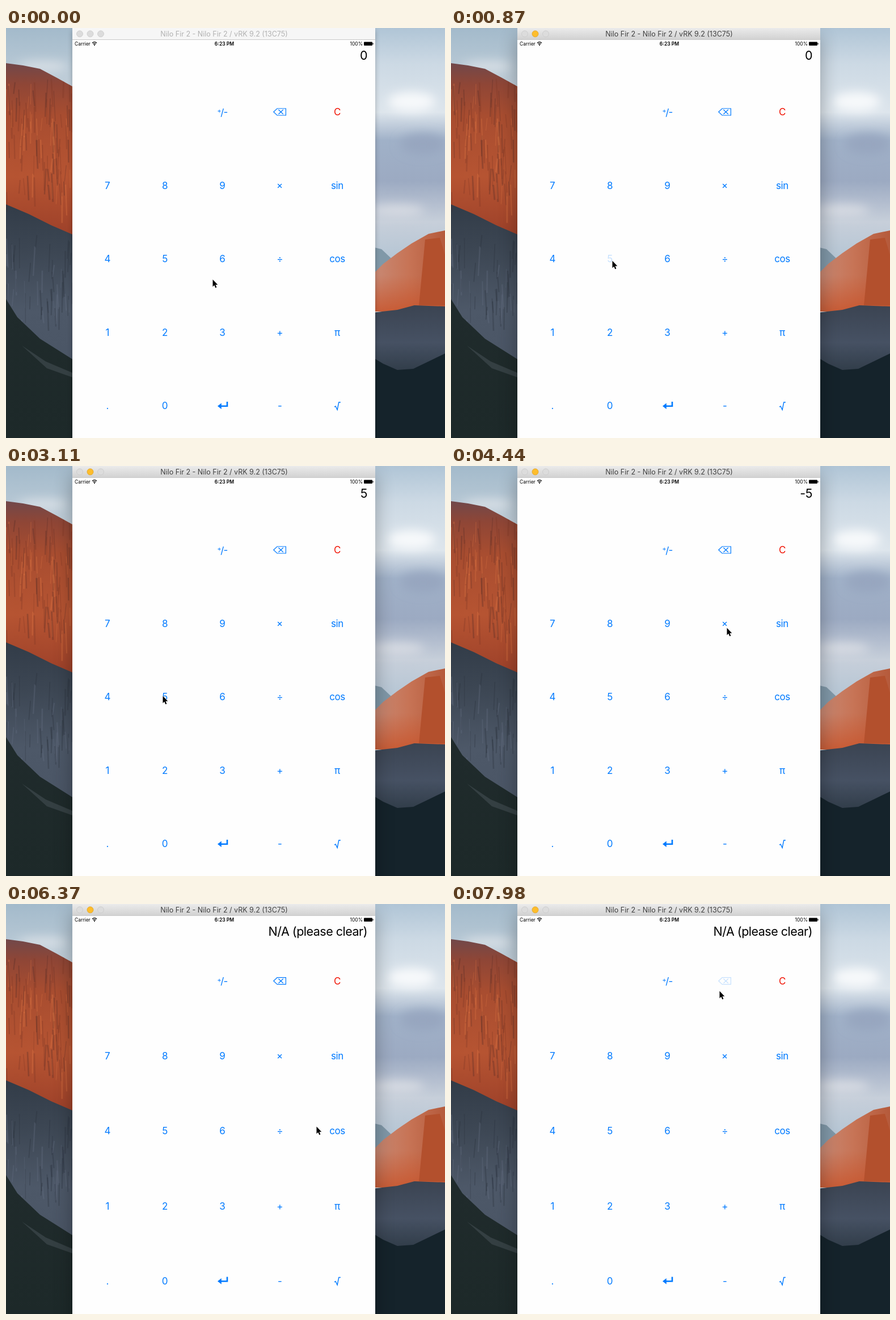
An HTML page for the animation above (8000 ms loop, 774 by 723 pixels).

```html
<!DOCTYPE html>
<html lang="en">
<head>
<meta charset="utf-8">
<title>Calculator</title>
<style>
  html, body { margin: 0; height: 100%; overflow: hidden; }
  svg { display: block; width: 774px; height: 723px; }
  text { font-family: Inter, Roboto, sans-serif; }
  #keys { font-size: 17px; letter-spacing: -.45px; text-anchor: middle; fill: #007aff; }
  #keys path { fill: none; stroke: #007aff; stroke-width: 1.2; }
  #display { font-size: 21.5px; letter-spacing: -.5px; text-anchor: end; }
  #title { font-size: 12.5px; text-anchor: middle; }
  .status { font-size: 8.5px; }
</style>
</head>
<body>
<svg viewBox="0 0 774 723">
  <defs>
    <linearGradient id="leftSky" x2="0" y2="1"><stop stop-color="#a3bacb"/><stop offset="1" stop-color="#c3d0da"/></linearGradient>
    <linearGradient id="cliff" x2="0" y2="1">
      <stop stop-color="#71484a"/><stop offset=".12" stop-color="#8f4636"/><stop offset=".3" stop-color="#a84d30"/>
      <stop offset=".65" stop-color="#b65432"/><stop offset="1" stop-color="#9c4029"/>
    </linearGradient>
    <linearGradient id="shade" x2="0" y2="1"><stop stop-color="#323c48"/><stop offset=".3" stop-color="#3d4754"/><stop offset=".65" stop-color="#4d5868"/><stop offset="1" stop-color="#4a5565"/></linearGradient>
    <linearGradient id="forest" x2="0" y2="1"><stop stop-color="#202b2c"/><stop offset="1" stop-color="#1d2929"/></linearGradient>
    <linearGradient id="rightSky" x2="0" y2="1">
      <stop stop-color="#b0c5d6"/><stop offset=".14" stop-color="#ccd9e4"/><stop offset=".33" stop-color="#dde5ec"/>
      <stop offset=".44" stop-color="#a0b1c8"/><stop offset=".6" stop-color="#9caac2"/>
      <stop offset=".76" stop-color="#c7cfda"/><stop offset="1" stop-color="#a9bfd0"/>
    </linearGradient>
    <linearGradient id="peak"><stop stop-color="#c88a76"/><stop offset=".5" stop-color="#c77456"/><stop offset="1" stop-color="#b55a3b"/></linearGradient>
    <linearGradient id="glow" x2="0" y2="1"><stop stop-color="#c8532a" stop-opacity="0"/><stop offset="1" stop-color="#c8532a" stop-opacity=".8"/></linearGradient>
    <linearGradient id="slope" x2="0" y2="1"><stop stop-color="#3b4452"/><stop offset=".5" stop-color="#465163"/><stop offset="1" stop-color="#2b3742"/></linearGradient>
    <linearGradient id="bar" x2="0" y2="1"><stop stop-color="#ebebeb"/><stop offset="1" stop-color="#d2d2d2"/></linearGradient>
    <filter id="soft" x="-50%" y="-100%" width="200%" height="300%"><feGaussianBlur stdDeviation="9"/></filter>
    <filter id="near" x="-10%" width="120%"><feGaussianBlur stdDeviation="5"/></filter>
    <filter id="far" x="-20%" width="140%"><feGaussianBlur stdDeviation="17"/></filter>
    <clipPath id="cliffEdge"><path d="M0 62 30 66 60 72 90 88 117 103V590L60 555 20 510 0 478Z"/></clipPath>
  </defs>

  <!-- Wallpaper -->
  <rect width="130" height="110" fill="url(#leftSky)"/>
  <ellipse cx="65" cy="68" rx="45" ry="9" fill="#d9e0e6" filter="url(#soft)"/>
  <path d="M0 62 30 66 60 72 90 88 117 103V370H0Z" fill="url(#cliff)"/>
  <path d="M0 311 40 328 80 348 117 364V600H0Z" fill="url(#shade)"/>
  <g id="cracks" clip-path="url(#cliffEdge)" fill="none"></g>
  <path d="M0 478 20 510 60 548 117 584V723H0Z" fill="url(#forest)"/>
  <path d="M28 560 70 588 117 608 117 616 72 600Z" fill="#343f42"/>
  <rect x="645" width="129" height="450" fill="url(#rightSky)"/>
  <g filter="url(#soft)">
    <ellipse cx="715" cy="130" rx="42" ry="17" fill="#f7f9fb"/>
    <ellipse cx="690" cy="322" rx="48" ry="10" fill="#d8dce3"/>
    <ellipse cx="735" cy="205" rx="40" ry="18" fill="#97a6bf"/>
  </g>
  <path d="M645 386 662 390 680 407V440H645Z" fill="#8098a8"/>
  <g id="mountain">
    <path d="M645 436 665 416 690 397 715 380 745 363 774 357V500H645Z" fill="url(#peak)"/>
    <path d="M645 436H774V500H645Z" fill="url(#glow)"/>
    <path d="M739 373 765 370 774 400V489H728Z" fill="#b3502d"/>
  </g>
  <path d="M645 502 690 497 720 489 774 491V620H645Z" fill="url(#slope)"/>
  <path d="M645 580 665 592 690 603 718 601 745 588 774 574V723H645Z" fill="#15232b"/>

  <!-- Window -->
  <rect id="nearShadow" x="117" y="4" width="534" height="740" opacity=".25" filter="url(#near)"/>
  <rect id="farShadow" x="117" y="15" width="534" height="760" opacity=".3" filter="url(#far)"/>
  <rect x="117" width="534" height="723" fill="#fefefe"/>
  <rect id="titleBar" x="117" width="534" height="20"/>
  <path d="M117 20.5H651" stroke="#c9c9c9"/>
  <g id="lights" stroke="#cacaca" stroke-width=".8" fill="#dcdcdc">
    <circle cx="130" cy="10.3" r="5.5"/><circle id="amber" cx="148.5" cy="10.3" r="5.5"/><circle cx="167" cy="10.3" r="5.5"/>
  </g>
  <text id="title" x="384.5" y="15">Nilo Fir 2 - Nilo Fir 2 / vRK 9.2 (13C75)</text>
  <text class="status" x="121" y="31">Carrier</text>
  <g fill="none" stroke="#000" stroke-width="1.3">
    <path d="M152 26.5Q156 22.8 160 26.5M153.7 28.4Q156 26.3 158.3 28.4"/>
    <path d="M156 29v2" stroke-width="1.7"/>
  </g>
  <text class="status" x="385" y="31" text-anchor="middle" font-weight="600">6:23 PM</text>
  <text class="status" x="629" y="31" text-anchor="end">100%</text>
  <rect x="631" y="24.5" width="15" height="6.5" rx="1"/><rect x="646.5" y="26.5" width="1.2" height="2.5"/>
  <text id="display" x="637" y="56"></text>
  <g id="keys"></g>
  <path id="cursor" d="M.5 .5V13.2L3.3 10.5 5.3 15.2 7.4 14.3 5.4 9.7H9.3Z" stroke="#fff" stroke-width="1" paint-order="stroke"/>
</svg>
<script>
const byId = id => document.getElementById(id);
const LOOP = 8000, STEP = 148, LEAD = 18;

// Rock streaks on the cliff
let seed = 7;
const random = () => (seed = seed * 16807 % 2147483647) / 2147483647;
const streak = (low, high, colors) => {
  const x = random() * 117, y = low + random() * (high - low);
  const color = colors[Math.floor(random() * colors.length)];
  return `<path d="M${x} ${y}l${random() * 6 - 3} ${20 + random() * 35}" stroke="${color}"
    stroke-width="${1 + random() * 2}" opacity=".3"/>`;
};
byId('cracks').innerHTML =
  Array.from({ length: 90 }, () => streak(80, 275 + random() * 20, ['#4e2826', '#e37a48', '#7c3527'])).join('') +
  Array.from({ length: 50 }, () => streak(365, 520, ['#28303b', '#667084'])).join('');

// Keypad: symbols are centred on their own origin
const label = s => `<text y="6.2">${s}</text>`;
const icons = {
  sign: '<text x="-5.6" y="2" font-size="11.5">+</text><text x="-.2" y="6.5">/</text><text x="6" y="6">-</text>',
  back: '<path d="M-10.8 0-4.5-6H10.8V6H-4.5ZM-2.2-4 6.2 4M6.2-4-2.2 4"/>',
  times: '<path d="M-3.4-2.6 3.4 4.2M3.4-2.6-3.4 4.2" style="stroke-width:1.4"/>',
  enter: '<path d="M8.7-7V.8H-3" style="stroke-width:2.6"/><path d="M-8.3 .8-1.5-4.4V6Z" style="fill:#007aff;stroke:none"/>',
  root: '<path d="M-5 2.2-2.8 .9 .2 7.2 2.9-6H6" style="stroke-width:1.4"/>'
};
const rows = [
  ['', '', 'sign', 'back', 'C'],
  ['7', '8', '9', 'times', 'sin'],
  ['4', '5', '6', '÷', 'cos'],
  ['1', '2', '3', '+', 'π'],
  ['.', '0', 'enter', '-', 'root']
];
const keys = {};
rows.forEach((names, row) => names.forEach((name, column) => {
  if (!name) return;
  const node = document.createElementNS('http://www.w3.org/2000/svg', 'g');
  node.innerHTML = icons[name] || label(name);
  if (name === 'C') node.setAttribute('fill', '#f01000');
  byId('keys').append(node);
  keys[name] = { node, row, x: 178.7 + 101.3 * column };
}));

// All times below are in steps
const path = [
  [0, 364, 443], [1, 364, 443], [4, 290, 413], [5, 284, 410], [8, 284, 410],
  [9, 283, 412], [12, 374, 620], [13, 374, 624], [15, 373, 647], [16, 370, 640],
  [19, 278, 410], [21, 276, 405], [23, 373, 250], [25, 375, 152], [27, 376, 152],
  [29, 481, 297], [30, 486, 285], [33, 486, 286], [37, 602, 666], [40, 600, 667],
  [41, 588, 610], [43, 547, 392], [46, 550, 265], [48, 525, 215], [51, 457, 150],
  [54, 473, 153]
];
const presses = [
  ['5', 6, 9], ['enter', 13, 15], ['5', 20, 21], ['sign', 25, 27],
  ['times', 32, 33], ['root', 39, 41], ['back', 53, 55]
];
const readings = [[0, '0'], [9, '5'], [27, '-5'], [41, 'N/A (please clear)']];
const ACTIVATE = 6, RELAYOUT = 41;

function cursorAt(step) {
  const next = Math.max(1, path.findIndex(point => point[0] >= step));
  const [t0, x0, y0] = path[next - 1], [t1, x1, y1] = path[next];
  const u = (step - t0) / (t1 - t0), ease = u * u * (3 - 2 * u);
  return [x0 + (x1 - x0) * ease, y0 + (y1 - y0) * ease];
}

function draw(time) {
  const step = Math.min(54, Math.floor((time + LEAD) / STEP));
  const active = step >= ACTIVATE;
  byId('titleBar').setAttribute('fill', active ? 'url(#bar)' : '#f6f6f6');
  byId('title').setAttribute('fill', active ? '#404040' : '#b2b2b2');
  byId('amber').setAttribute('fill', active ? '#fdbd2c' : '#dcdcdc');
  byId('amber').setAttribute('stroke', active ? '#dfa023' : '#cacaca');
  byId('nearShadow').style.display = active ? 'none' : '';
  byId('farShadow').style.display = active ? '' : 'none';

  byId('display').textContent = readings.filter(([start]) => start <= step).pop()[1];
  const [top, gap] = step >= RELAYOUT ? [135.7, 132.2] : [148, 129.5];
  for (const [name, { node, row, x }] of Object.entries(keys)) {
    const pressed = presses.some(([key, from, to]) => key === name && step >= from && step < to);
    node.setAttribute('transform', `translate(${x} ${top + gap * row})`);
    node.setAttribute('opacity', pressed ? .22 : 1);
  }
  byId('cursor').setAttribute('transform', `translate(${cursorAt(step)})`);
}

const start = performance.now();
function tick() {
  draw((performance.now() - start) % LOOP);
  requestAnimationFrame(tick);
}
tick();
</script>
</body>
</html>
```
